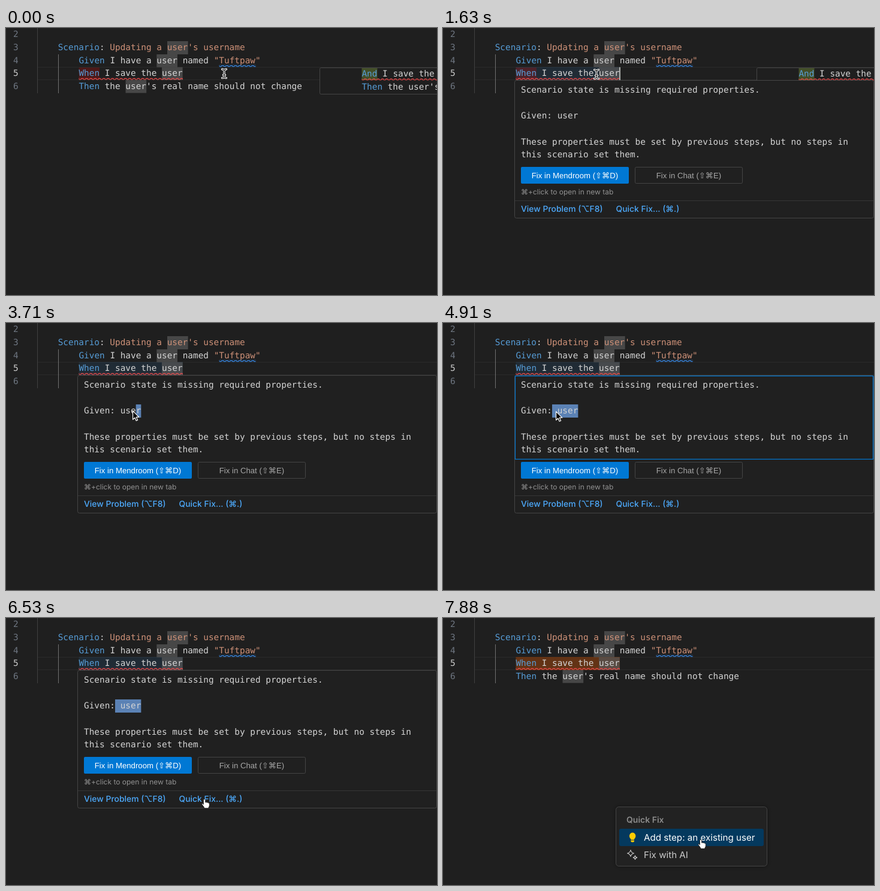
Recreate the animation shown at these times as an HTML page. Size 719 by 446 pixels, loop 8000 ms.

```html
<!DOCTYPE html>
<html lang="en">
<head>
<meta charset="utf-8">
<title>Quick fix for a scenario step</title>
<style>
  html, body { margin: 0; width: 100%; height: 100%; overflow: hidden; background: #1f1f1f; }
  svg { display: block; width: 719px; height: 446px; }
  text { white-space: pre; text-rendering: geometricPrecision; }
  .code { font: 14.4px "DejaVu Sans Mono", monospace; fill: #d4d4d4; }
  .num { fill: #6e7681; }
  .kw { fill: #569cd6; }
  .str { fill: #ce9178; }
  .word { fill: #575757; fill-opacity: .72; }
  .ui { font: 500 13.9px Inter, "DejaVu Sans", sans-serif; }
  .link { fill: #4daafc; }
  .button { font: 13.2px "Liberation Sans", "DejaVu Sans", sans-serif; text-anchor: middle; }
  .item { font: 15.15px Inter, sans-serif; fill: #ccc; }
  .panel { fill: #202020; stroke: #454545; }
</style>
</head>
<body>
<svg viewBox="0 0 719 446" xmlns="http://www.w3.org/2000/svg">
  <defs>
    <path id="wave" d="M5.5 0 2.5 3H1.1L4.1 0ZM4 0 6 2V.6L5.4 0ZM0 2 1 3H2.4L0 .6Z"/>
    <pattern id="redWave" width="6" height="3" patternUnits="userSpaceOnUse" patternTransform="translate(121.5 83.2) scale(1.2)">
      <use href="#wave" fill="#f14c4c"/>
    </pattern>
    <pattern id="redWaveHint" width="6" height="3" patternUnits="userSpaceOnUse" patternTransform="translate(593.5 84) scale(1.2)">
      <use href="#wave" fill="#f14c4c"/>
    </pattern>
    <pattern id="blueWave" width="6" height="3" patternUnits="userSpaceOnUse" patternTransform="translate(355.6 61.6) scale(1.2)">
      <use href="#wave" fill="#3794ff"/>
    </pattern>
    <filter id="shadow" x="-10%" y="-20%" width="120%" height="140%">
      <feDropShadow dx="0" dy="0" stdDeviation="4.5" flood-color="#000" flood-opacity=".36"/>
    </filter>
  </defs>

  <rect width="719" height="446" fill="#1f1f1f"/>

  <!-- editor -->
  <path d="M53 65.5H719M53 86.5H719" stroke="#2a2a2a"/>
  <path d="M52.5 0V109" stroke="#404040"/>
  <path d="M87.5 44V109" stroke="#707070"/>
  <rect id="hoverRange" x="121.5" y="65" width="173.5" height="22" fill="#264f78" fill-opacity=".25"/>
  <rect id="removed" x="121.5" y="66" width="34.5" height="20" fill="#f00" fill-opacity=".2"/>
  <rect id="fixRange" x="121.5" y="65" width="173.5" height="22" fill="#633315"/>
  <g class="word">
    <rect x="269" y="22" width="34.7" height="22"/>
    <rect x="251.3" y="44" width="34.7" height="21.5"/>
    <rect x="260" y="65.5" width="34.7" height="21.5"/>
    <rect x="199.5" y="87" width="34.7" height="21.5"/>
  </g>
  <g class="code">
    <g class="num">
      <text x="12" y="15">2</text>
      <text x="12" y="37">3</text>
      <text x="12" y="59">4</text>
      <text x="12" y="80" fill="#ccc">5</text>
      <text x="12" y="102">6</text>
    </g>
    <text x="86.7" y="37"><tspan class="kw">Scenario</tspan>: <tspan class="str">Updating a user's username</tspan></text>
    <text x="121.4" y="59"><tspan class="kw">Given</tspan> I have a user named <tspan class="str">"Tuftpaw"</tspan></text>
    <text x="121.4" y="80"><tspan class="kw">When</tspan> I save the user</text>
    <text x="121.4" y="102"><tspan class="kw">Then</tspan> the user's real name should not change</text>
  </g>
  <rect x="355.6" y="61.6" width="61" height="3.6" fill="url(#blueWave)"/>
  <rect x="121.5" y="83.2" width="173.5" height="3.6" fill="url(#redWave)"/>
  <rect id="caret" x="294" y="65.5" width="2" height="21.5" fill="#aeafad"/>

  <!-- inline edit suggestion -->
  <g id="suggestion">
    <rect class="panel" x="523.5" y="66.5" width="220" height="44" rx="2" style="fill:#1f1f1f"/>
    <rect x="593.5" y="67" width="26" height="20" fill="#434f29"/>
    <g class="code">
      <text x="593.4" y="81"><tspan class="kw">And</tspan> I save the user</text>
      <text x="593.4" y="103"><tspan class="kw">Then</tspan> the user's real name</text>
    </g>
    <rect x="593.5" y="84" width="126" height="3.6" fill="url(#redWaveHint)"/>
  </g>

  <!-- problem hover -->
  <g id="hover">
    <rect class="panel" x="119.5" y="87.5" width="599" height="230" rx="3"/>
    <rect id="selection" y="136" height="22" fill="#5b82b5"/>
    <g class="code">
      <text x="130" y="108">Scenario state is missing required properties.</text>
      <text x="130" y="151">Given: user</text>
      <text x="130" y="195">These properties must be set by previous steps, but no steps in</text>
      <text x="130" y="216">this scenario set them.</text>
    </g>
    <rect id="focusRing" x="120.5" y="88.5" width="597" height="139" fill="none" stroke="#0078d4" stroke-width="1.2"/>
    <rect x="130" y="232" width="180" height="28" rx="2" fill="#0078d4"/>
    <rect x="320.5" y="232.5" width="179" height="27" rx="2" fill="none" stroke="#454545"/>
    <text class="button" x="220" y="251" fill="#fff">Fix in Mendroom (⇧⌘D)</text>
    <text class="button" x="410" y="251" fill="#a6a6a6">Fix in Chat (⇧⌘E)</text>
    <text class="ui" x="130" y="278" fill="#919191" style="font-size:12px;font-weight:400">⌘+click to open in new tab</text>
    <path d="M120 288.5H718" stroke="#353535"/>
    <text class="ui link" x="130" y="307">View Problem (⌥F8)</text>
    <text class="ui link" x="288.5" y="307">Quick Fix... (⌘.)</text>
  </g>

  <!-- quick fix menu -->
  <g id="menu">
    <rect class="panel" x="288.5" y="315.5" width="252" height="99" rx="5" filter="url(#shadow)"/>
    <rect id="activeItem" x="294" y="352" width="241" height="29" rx="3" fill="#04395e"/>
    <text class="ui" x="306" y="342" fill="#8c8c8c" style="font-size:14px;font-weight:600">Quick Fix</text>
    <path d="M313.4 369.2C309 365.5 311 358.4 316.2 358.4S323.4 365.5 319 369.2V370.4H313.4ZM313.4 371.6H319V373.2Q318.6 374.6 316.2 374.6T313.4 373.2Z" fill="#fc0"/>
    <text id="itemText" class="item" x="335" y="372">Add step: an existing user</text>
    <g fill="none" stroke="#ccc" stroke-width="1.1" stroke-linejoin="round">
      <path d="M313 387.5Q314 392 318.5 393Q314 394 313 398.5Q312 394 307.5 393Q312 392 313 387.5Z"/>
      <path d="M320.5 396.8Q321 399.6 323.8 400.1Q321 400.6 320.5 403.4Q320 400.6 317.2 400.1Q320 399.6 320.5 396.8Z"/>
    </g>
    <text class="item" x="335" y="401">Fix with AI</text>
  </g>

  <!-- pointer shapes, origin at the hot spot -->
  <g id="pointer">
    <g id="beam" fill="none" stroke-linecap="round">
      <path id="beamPath" d="M-3.5-7Q-.5-7 0-5Q.5-7 3.5-7M0-5V5M-3.5 7.5Q-.5 7.5 0 5Q.5 7.5 3.5 7.5M-1.8 2.5H1.8" stroke="#fff" stroke-width="2.8"/>
      <use href="#beamPath"/>
      <path d="M-3.5-7Q-.5-7 0-5Q.5-7 3.5-7M0-5V5M-3.5 7.5Q-.5 7.5 0 5Q.5 7.5 3.5 7.5M-1.8 2.5H1.8" stroke="#111" stroke-width="1.1"/>
    </g>
    <path id="arrow" d="M.6.8V15.2L3.9 12.1 6.2 17.3 8.6 16.3 6.3 11.2H10.8Z" fill="#000" stroke="#fff" stroke-width="1.2" stroke-linejoin="round"/>
    <path id="hand" d="M-1.6 1.6Q0-.6 1.6 1.6V6q1.3-1.2 2.5.2q1.4-.8 2.3.6q1.6-.5 1.9 1.4v3.3q-.4 2-1.4 3v1.3H.2q-1.5-3.2-4.2-6.2q-.8-1.9 1-2.2L-1.6 9.4Z" fill="#fff" stroke="#111" stroke-width=".8"/>
  </g>
</svg>

<script>
const LOOP = 8000;
const CHAR = 8.669;
const $ = id => document.getElementById(id);
const show = (id, on) => $(id).setAttribute("visibility", on ? "inherit" : "hidden");
const between = (t, from, to) => t >= from && t < to;

// Pointer poses: shape, then [time, x, y] held until the next one
const moves = [
  ["beam", [0, 364, 76], [590, 350, 76], [740, 316, 76], [890, 282, 76], [1030, 262, 76],
    [1180, 256, 77], [2530, 254, 82]],
  ["arrow", [2680, 248, 108], [2820, 241, 133], [2970, 238, 143],
    [3410, 230, 146], [3560, 221, 146], [3710, 211, 146], [3860, 200, 146], [4010, 190, 146], [4160, 185, 146],
    [4910, 188, 147], [5060, 214, 149], [5200, 254, 151], [5350, 292, 152], [5490, 308, 152],
    [5640, 312, 178], [5780, 321, 236], [5930, 325, 281]],
  ["hand", [6080, 331, 302]],
  ["arrow", [6680, 329, 302], [7130, 341, 319], [7280, 358, 338]],
  ["hand", [7430, 392, 363], [7580, 420, 379], [7730, 429, 375], [7880, 430, 369.5]]
];
const poses = moves.flatMap(([shape, ...steps]) => steps.map(([time, x, y]) => ({ shape, time, x, y })));

function selectedChars(t) {
  if (t < 3710) return 0;
  if (t < 3860) return 1;
  return t < 4010 ? 3 : 5;
}

function draw(t) {
  const hoverOpen = between(t, 1630, 6680);
  const itemActive = between(t, 6680, 7130) || t >= 7430;

  show("caret", between(t, 590, 1180) || between(t, 1630, 2080) || between(t, 2530, 2970));
  show("suggestion", t < 3410);
  show("removed", t < 3410);
  show("hoverRange", hoverOpen);
  show("hover", hoverOpen);
  show("focusRing", between(t, 4910, 5780));
  // A hidden parent must win over the ring's own state
  $("hover").style.display = hoverOpen ? "" : "none";

  const width = selectedChars(t) * CHAR;
  $("selection").setAttribute("x", 130 + 11 * CHAR - width);
  $("selection").setAttribute("width", width);

  show("menu", t >= 6680);
  show("activeItem", itemActive);
  show("fixRange", itemActive);
  $("itemText").style.fill = itemActive ? "#fff" : "#ccc";

  const pose = poses.findLast(p => p.time <= t);
  $("pointer").setAttribute("transform", `translate(${pose.x} ${pose.y})`);
  for (const shape of ["beam", "arrow", "hand"]) show(shape, shape === pose.shape);
}

const start = performance.now();
function tick() {
  draw((performance.now() - start) % LOOP);
  requestAnimationFrame(tick);
}
tick();
</script>
</body>
</html>
```
